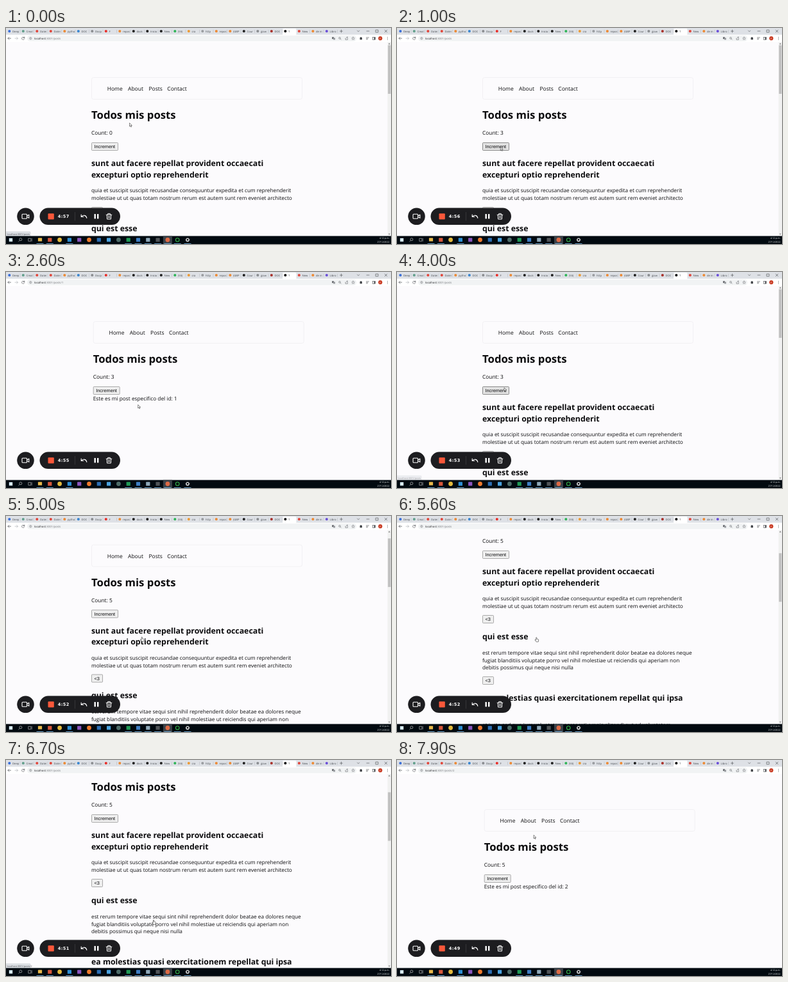
Animation of 600x338 px, one loop 8 s. Source, as an HTML page:

```html
<!DOCTYPE html>
<html lang="es">
<head>
<meta charset="utf-8">
<title>Todos mis posts</title>
<style>
  html, body { margin: 0; width: 100%; height: 100%; overflow: hidden; background: #fcfbfd; }
  svg { display: block; width: 600px; height: 338px; }
  text { font-family: "Open Sans", "Noto Sans", sans-serif; text-rendering: geometricPrecision; white-space: pre; }
  .btn text { font-family: "Liberation Sans", Arial, sans-serif; }
  .btn rect { fill: #efefef; stroke: #8a8a8a; stroke-width: .7; }
  .hover rect { fill: #e2e2e2; stroke: #606060; }
  .line { fill: none; stroke-linecap: round; stroke-linejoin: round; }
  #clock { font: 700 6.6px "DejaVu Sans", sans-serif; letter-spacing: .4px; }
</style>
</head>
<body>
<svg id="stage" viewBox="0 0 600 338"></svg>
<script>
const text = (x, y, size, str, attrs = '') => `<text x="${x}" y="${y}" font-size="${size}" ${attrs}>${str}</text>`;
const rect = (x, y, w, h, fill, attrs = '') => `<rect x="${x}" y="${y}" width="${w}" height="${h}" fill="${fill}" ${attrs}/>`;
const circle = (x, y, r, fill, attrs = '') => `<circle cx="${x}" cy="${y}" r="${r}" fill="${fill}" ${attrs}/>`;
const line = (d, color, width = .7) => `<path class="line" d="${d}" stroke="${color}" stroke-width="${width}"/>`;
const button = (y, w, label, id = '') =>
  `<g class="btn" ${id}>${rect(133.5, y, w, 12, '', 'rx="1"')}${text(137.5, y + 8.6, 7.35, label)}</g>`;
const lines = (y, step, size, rows, attrs) => rows.map((s, i) => text(133, y + i * step, size, s, attrs)).join('');

const posts = [
  [216, ['sunt aut facere repellat provident occaecati', 'excepturi optio reprehenderit'],
    ['quia et suscipit suscipit recusandae consequuntur expedita et cum reprehenderit',
     'molestiae ut ut quas totam nostrum rerum est autem sunt rem eveniet architecto']],
  [317.8, ['qui est esse'],
    ['est rerum tempore vitae sequi sint nihil reprehenderit dolor beatae ea dolores neque',
     'fugiat blanditiis voluptate porro vel nihil molestiae ut reiciendis qui aperiam non',
     'debitis possimus qui neque nisi nulla']],
  [413.5, ['ea molestias quasi exercitationem repellat qui ipsa', 'sit aut'],
    ['et iusto sed quo iure voluptatem occaecati omnis eligendi aut ad voluptatem']]
];
const post = ([y, title, body]) => {
  const bodyY = y + 23.9 + (title.length - 1) * 17.5;
  return lines(y, 17.5, 12.3, title, 'font-weight="700"') + lines(bodyY, 11.8, 8.26, body) +
    button(Math.round(bodyY + body.length * 11.8) - .5, 17, '&lt;3');
};

const page = `<g id="page" fill="#0c0c0e">
  ${rect(133.5, 77.5, 328, 34, 'none', 'rx="3" stroke="#efeef1" stroke-width=".8"')}
  ${text(157.7, 98, 8.5, 'Home')}${text(190, 98, 8.5, 'About')}${text(222.4, 98, 8.5, 'Posts')}${text(251.3, 98, 8.5, 'Contact')}
  ${text(133, 142, 16.75, 'Todos mis posts', 'font-weight="700"')}
  ${text(133, 167.4, 8.4, 'Count: 0', 'id="count"')}
  ${button(179.5, 41, 'Increment', 'id="inc"')}
  <g id="list">${posts.map(post).join('')}</g>
  ${text(133, 200.6, 8.3, '', 'id="detail"')}
</g>`;

const scrollbar = `<g id="bar">${rect(594.5, 22, 5.5, 303.5, '#f1f1f1')}
  <path d="M595.8 25.4l1.5-1.8 1.5 1.8zM595.8 321.8l1.5 1.8 1.5-1.8z" fill="#777"/>
  ${rect(595.2, 27, 4.3, 76, '#c1c1c1', 'id="thumb"')}</g>`;

const bubble = `<g id="bubble">${rect(-1, 318.8, 39, 8, '#dee1e6', 'rx="1" stroke="#c0c3c8" stroke-width=".4"')}
  ${text(1.5, 323.7, 3.7, '', 'id="link" fill="#45484c"')}</g>`;

// Browser frame: tab strip and toolbar
const tabs = `Deep #3b6fd8,Creat #63a08c,Datei #e0473c,Datei #e0473c,pytho #ec8a35,DOC #3a86d0,Docp #8a8d91,F #e8302a,
repos #ec8a35,dock #222,Inicio #222,New #222,(55) #2fb457,cra #ec9a35,http #9a9da1,repos #ec8a35,(GBP #ec8a35,Cour #222,
giaw #8a8d91,DOC #a8322c,T #111,New #e0473c,de in #ec8a35,Libro #6b4fd8`.split(',');
const tab = (entry, i) => {
  const [, name, color] = entry.trim().match(/(.*) (#\w+)/), x = 5 + i * 21.5;
  return (i == 20 ? rect(x - 4, 1, 21.5, 10, '#fff', 'rx="1.5"') : line(`M${x + 17} 3.2v4`, '#a4a8ae', .4)) +
    circle(x + .3, 5, 2.1, color) + text(x + 5, 6.5, 4.2, name, 'fill="#45494e"');
};
const chrome = rect(0, 0, 600, 11, '#dee1e6') + rect(0, 10.5, 600, 11.5, '#fff') + tabs.map(tab).join('') +
  line('M520.5 5h4M522.5 3v4M547.5 4.1l1.6 1.6 1.6-1.6M562 4.9h4M576.4 3.1h3.6v3.6h-3.6zM590.3 3.1l3.6 3.6M593.9 3.1l-3.6 3.6', '#44474b', .6) +
  rect(33, 11.8, 513, 9, '#f1f3f4', 'rx="4.5"') +
  line('M7.5 16.2h-4.5m1.9-1.9l-1.9 1.9 1.9 1.9', '#55585c') + line('M14 16.2h4.5m-1.9-1.9l1.9 1.9-1.9 1.9', '#b2b5b9') +
  line('M28.6 15.3a2.1 2.1 0 1 0 .1 1.7M28.8 13.9v1.6h-1.6', '#55585c') +
  circle(38.3, 16.2, 1.7, 'none', 'stroke="#66696d" stroke-width=".5"') + line('M38.3 16v1.1M38.3 15.2v.05', '#66696d', .5) +
  `<text x="44" y="17.8" font-size="4.3" fill="#202124">localhost<tspan id="url" fill="#74777b"></tspan></text>` +
  rect(508, 14.2, 3, 3, '#6a6d71') + rect(510, 15.4, 3, 3, '#989ba0') +
  circle(520, 15.8, 1.4, 'none', 'stroke="#66696d" stroke-width=".6"') +
  line('M521 16.9l1.2 1.2M529 16v2.3h3.4v-2M530 16.2l2.2-2m-1.2 0h1.2v1.2', '#66696d', .6) +
  line('M541 14l.7 1.5 1.6.2-1.2 1.1.3 1.6-1.4-.8-1.4.8.3-1.6-1.2-1.1 1.6-.2z', '#66696d', .5) +
  rect(551.5, 15, 3.4, 3.2, '#3f4246', 'rx=".5"') + circle(553.2, 14.8, .9, '#3f4246') +
  line('M561.5 14.8h4M561.5 16.3h2.6M561.5 17.8h2', '#55585c', .6) +
  rect(571.5, 14.4, 3.8, 3.8, 'none', 'stroke="#44474b" stroke-width=".6"') + rect(573.6, 14.4, 1.7, 3.8, '#44474b') +
  circle(583.3, 16.2, 3.1, '#c93a22') + text(583.3, 17.5, 3.5, 'P', 'fill="#fff" text-anchor="middle"') +
  [14.5, 16.2, 17.9].map(y => circle(594.6, y, .5, '#55585c')).join('');

// Taskbar: app marks are plain squares and circles
const apps = '#e9b84a #d8573a #e3b93c #2d8fd5 #8a55c0 #ee7a2c #2c6fb5 #4aa3e0 #4d6b68 #1f9a55 #3f7fc4 #8fa9ba #505458 #dd6a45 #35b34a'.split(' ');
const app = (color, i) => {
  const x = 53 + i * 15.3;
  const mark = [2, 5, 8, 13].includes(i) ? circle(x, 331.5, 3.4, color)
    : i == 14 ? circle(x, 331.5, 2.8, 'none', `stroke="${color}" stroke-width="1.1"`)
    : rect(x - 3.1, 328.6, 6.2, i ? 6 : 5.2, color, 'rx=".6"');
  return (i == 13 ? rect(x - 7, 325.5, 14, 12.5, '#3a4148') : '') + mark +
    (i == 0 || i == 1 || i == 3 || i > 8 ? rect(x - 5.5, 337.2, 11, .8, '#76b9ed') : '');
};
const taskbar = rect(0, 325.5, 600, 12.5, '#020a10') + rect(4.8, 328.9, 5.4, 5.4, '#d9eef8') +
  circle(22.8, 330.8, 2, 'none', 'stroke="#ddd" stroke-width=".6"') +
  line('M21.4 332.3l-1.8 1.9M35.2 329.3h3.6v4.4h-3.6zM40.2 329.3v4.4', '#ccc', .6) + apps.map(app).join('') +
  circle(283, 331.5, 2, 'none', 'stroke="#eee" stroke-width="1.2"') +
  circle(283, 331.5, 2.9, 'none', 'stroke="#eee" stroke-width=".8" stroke-dasharray="1.1 1.18"') + rect(277.5, 337.2, 11, .8, '#76b9ed') +
  text(597.5, 330.1, 3.6, '4:12 p.m.', 'fill="#fff" text-anchor="end"') +
  text(597.5, 336.2, 3.6, '27/12/2022', 'fill="#fff" text-anchor="end"');

const recorder = circle(30.5, 294.8, 13.3, '#1d1d20') + rect(52.5, 281.6, 125.5, 26.4, '#1d1d20', 'rx="13.2"') +
  line('M26 291.3h5.6q1 0 1 1v5q0 1-1 1h-5.6q-1 0-1-1v-5q0-1 1-1zM32.8 294l3-1.8v5.2l-3-1.8', '#fff', 1.1) +
  rect(65.5, 290.2, 9.3, 9.3, '#f9583a', 'rx="1"') +
  '<text id="clock" x="80.8" y="297.2" fill="#fff"></text>' +
  line('M107.5 288.5v12.6', '#414146', .7) +
  line('M117.2 292v3.5h3.5M117.4 295.3q2.4-2.6 5-1.9 2.9.8 3.4 4', '#fff', 1.1) +
  rect(137.5, 291, 2.4, 7.6, '#fff', 'rx=".5"') + rect(142, 291, 2.4, 7.6, '#fff', 'rx=".5"') +
  line('M156.2 292.3h8.6M158.7 292v-1.6h3.6v1.6M157.2 292.5l.4 6.6h5.8l.4-6.6M159.5 294.5v2.6M161.5 294.5v2.6', '#fff', 1);

const cursor = `<g id="cursor" fill="#fff" stroke="#222" stroke-width=".55" stroke-linejoin="round">
  <path id="arrow" d="M0 0v5.3l1.3-1.1.9 2 .9-.4-.9-2h1.7z"/>
  <path id="hand" d="M-.6 .5q.6-.9 1.2 0v2.2l2.2.5q.7.2.6 1l-.5 2.9h-3.2l-2-2.7q-.2-.9.6-.7l1.1.8z"/></g>`;

stage.innerHTML = rect(0, 0, 600, 338, '#fcfbfd') + page + scrollbar + bubble + chrome + taskbar + recorder + cursor;

const el = id => document.getElementById(id);
const show = (id, on) => el(id).setAttribute('display', on ? 'inline' : 'none');
const within = (t, ...spans) => spans.some(([a, b]) => t >= a && t < b);

// Eased value of a track of [time, value] keys
function track(t, keys) {
  const i = keys.findIndex(k => k[0] > t);
  if (i < 0) return keys[keys.length - 1][1];
  if (!i) return keys[0][1];
  const [t0, a] = keys[i - 1], [t1, b] = keys[i], u = (t - t0) / (t1 - t0);
  return a + (b - a) * u * u * (3 - 2 * u);
}

const path = [[0, 192.5, 148.7], [100, 192.5, 148.7], [600, 161.3, 186.3], [1200, 161.3, 186.3], [1600, 196, 212],
  [2300, 196, 212], [2600, 205.7, 207.7], [3200, 233, 93], [3400, 233, 93], [4000, 167, 181], [4200, 164, 184],
  [4600, 164, 184], [5100, 217.3, 189.8], [5900, 217.3, 189.8], [6200, 230, 250.2], [7000, 230, 250.2],
  [7600, 214.5, 166], [7700, 214.5, 166], [7900, 213, 117.5]];
const pathX = path.map(([t, x]) => [t, x]), pathY = path.map(([t, , y]) => [t, y]);
const scrollKeys = [[4800, 0], [5400, 125], [5600, 125], [5900, 94]];
const bubbleKeys = [[0, 1], [200, 1], [500, 0], [1400, 0], [1500, 1], [2100, 1], [2300, 0], [3000, 0], [3100, 1],
  [3800, 1], [4200, 0], [6100, 0], [6200, 1], [7100, 1], [7400, 0]];
const clicks = [600, 800, 1000, 4300, 4500];

function draw(now) {
  const t = Math.floor(now % 8000 / 100) * 100;
  const detail = within(t, [2100, 3400], [6800, 8000]), id = t < 5000 ? 1 : 2;
  const scroll = detail ? 0 : track(t, scrollKeys);

  el('page').setAttribute('transform', `translate(${detail ? 2.7 : 0} ${-scroll})`);
  show('list', !detail);
  show('bar', !detail);
  el('thumb').setAttribute('y', 27 + scroll * .25);
  el('detail').textContent = detail ? `Este es mi post especifico del id: ${id}` : '';
  el('count').textContent = `Count: ${clicks.filter(c => c <= t).length}`;
  el('inc').classList.toggle('hover', within(t, [500, 1300], [3900, 4700]));
  el('url').textContent = ':3001/posts' + (detail ? `/${id}` : '');

  el('bubble').setAttribute('opacity', track(t, bubbleKeys));
  el('link').textContent = 'localhost:3001/posts' + (within(t, [1400, 2500], [6000, 8000]) ? `/${id}` : '');
  el('clock').textContent = `4:${57 - Math.floor((t + 200) / 1000)}`;

  const hand = within(t, [1500, 2200], [3100, 3500], [4900, 6900]);
  show('hand', hand);
  show('arrow', !hand);
  el('cursor').setAttribute('transform', `translate(${track(t, pathX)} ${track(t, pathY)})`);
}

const start = performance.now();
(function tick() {
  draw(performance.now() - start);
  requestAnimationFrame(tick);
})();
</script>
</body>
</html>
```
